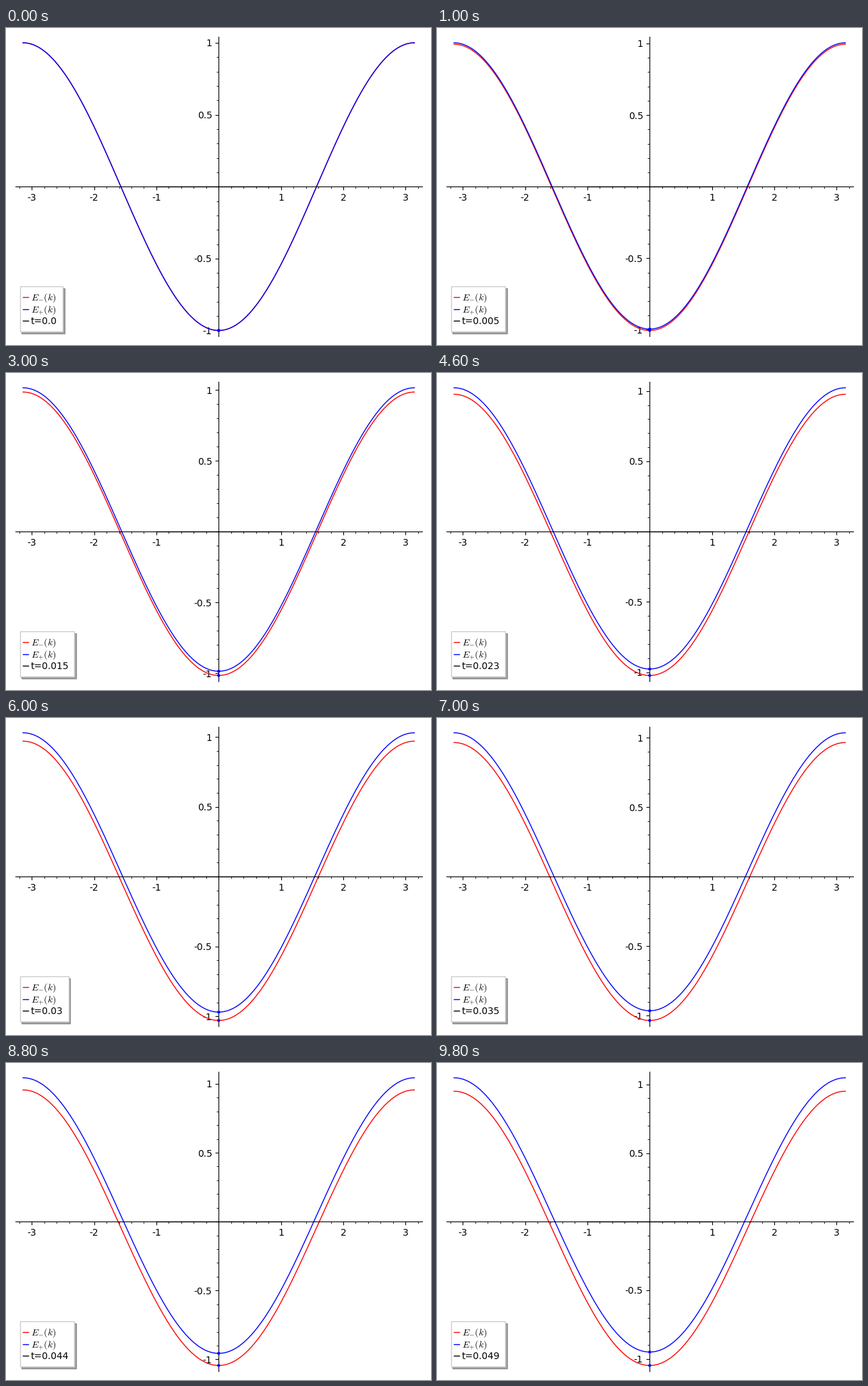
Write a matplotlib script that moves like this. It is 630 px wide and 470 px high and loops after 10000 ms.

```python
import numpy as np
import matplotlib.pyplot as plt
from matplotlib.animation import FuncAnimation
from matplotlib.ticker import AutoMinorLocator, FuncFormatter, MultipleLocator

W, H, DPI = 630, 470, 100
LEFT, RIGHT, TOP, BOTTOM = 13.6, 617.0, 13.4, 457.0
PAD = 1.04
FRAMES, INTERVAL = 50, 200

plt.rcParams.update({
    "font.family": "DejaVu Sans",
    "font.size": 10,
    "mathtext.fontset": "cm",
    "axes.unicode_minus": False,
})

fig = plt.figure(figsize=(W / DPI, H / DPI), dpi=DPI, facecolor="white")
ax = fig.add_axes([LEFT / W, 1 - BOTTOM / H, (RIGHT - LEFT) / W, (BOTTOM - TOP) / H])
ax.set_xlim(-PAD * np.pi, PAD * np.pi)

# Axes cross at the origin
for side in ("top", "right"):
    ax.spines[side].set_visible(False)
for side in ("left", "bottom"):
    ax.spines[side].set_position("zero")
label = FuncFormatter(lambda v, _: "" if abs(v) < 1e-9 else f"{v:g}")
for axis, step in ((ax.xaxis, 1), (ax.yaxis, 0.5)):
    axis.set_major_locator(MultipleLocator(step))
    axis.set_minor_locator(AutoMinorLocator(5))
    axis.set_major_formatter(label)

k = np.linspace(-np.pi, np.pi, 401)
band = -np.cos(k)
lower, = ax.plot(k, band, color="red", lw=1, label="$E_{-}(k)$")
upper, = ax.plot(k, band, color="blue", lw=1, label="$E_{+}(k)$")
ax.plot([-1, 1], [0, 0], color="black", lw=1, label="t=0.0")
dots = ax.scatter([0, 0], [-1, -1], s=10, color="blue", edgecolors="none", zorder=5)

legend = ax.legend(
    loc="lower left", fancybox=False, shadow=True, framealpha=1, facecolor="white",
    borderpad=0.6, handlelength=0.05, handletextpad=0.5, labelspacing=0.02,
    numpoints=2, markerscale=0.6,
)
t_text = legend.get_texts()[2]


def update(i):
    t = i / 1000
    lower.set_ydata(band - t)
    upper.set_ydata(band + t)
    dots.set_offsets([(0, -1 - t), (0, -1 + t)])
    ax.set_ylim(-PAD * (1 + t), PAD * (1 + t))
    t_text.set_text(f"t={t}")
    return lower, upper, dots, t_text


anim = FuncAnimation(fig, update, frames=FRAMES, interval=INTERVAL,
                     init_func=lambda: update(0), repeat=True, repeat_delay=0)
plt.show()
```
